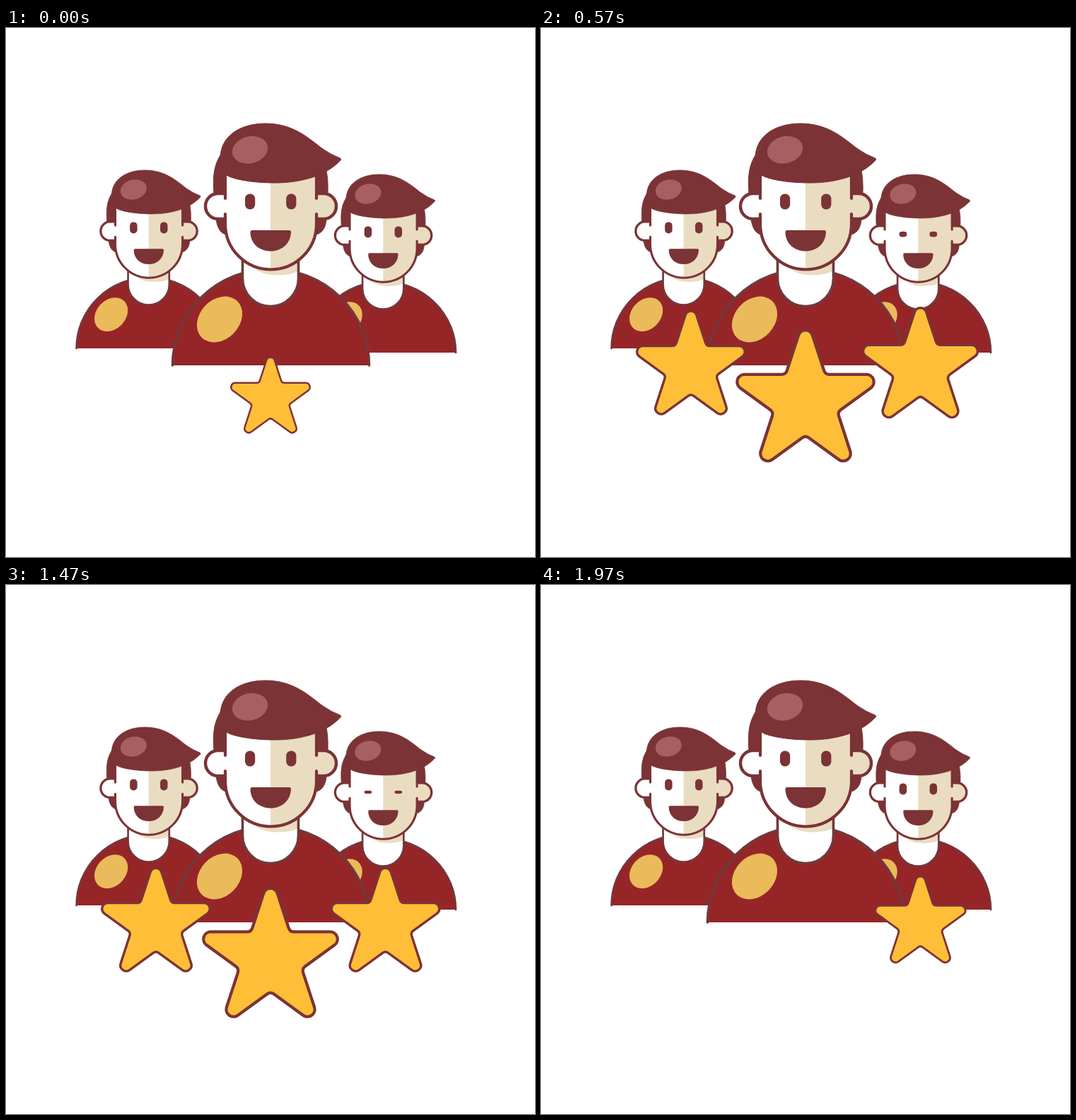
Recreate the animation shown at these times as an HTML page with a canvas. Size 748 px wide and 748 px high, loop 2 s.

```html
<!DOCTYPE html>
<html lang="en">
<head>
<meta charset="utf-8">
<title>Team rating</title>
<style>
html, body { margin: 0; width: 100%; height: 100%; overflow: hidden; background: #fff; }
canvas { display: block; width: 748px; height: 748px; }
</style>
</head>
<body>
<canvas id="stage" width="748" height="748"></canvas>
<script>
const ctx = document.getElementById('stage').getContext('2d');
const LOOP = 2000, FPS = 30;
const DARK = '#7b3336', EDGE = '#70393d', SHIRT = '#962528', GOLD = '#ebba5a';
const SHADE = '#eadcc1', SHINE = '#a75f62', STAR = '#ffbe37', WHITE = '#fff';

const shapes = {
  body: 'M235.5 477 A138.8 136 0 0 1 513.5 477',
  neck: 'M334.5 325 V354 A39.5 39.5 0 0 0 413.5 354 V325',
  backHair: 'M303 180 C292 198 293 215 294 235 L297 270 C299 285 305 292 314 292.5 H435 C445 292 452 285 453 270 L455 232 C456 210 452 192 446 180 Z',
  earL: 'M311 234 H300 A18 18 0 0 0 300 270 H311',
  earR: 'M438 234 H449 A18 18 0 0 1 449 270 H438',
  face: 'M310 200 V277 A64.5 64.5 0 0 0 439 277 V200 Z',
  half: 'M374 200 V341.5 A64.5 64.5 0 0 0 439 277 V200 Z',
  jaw: 'M310 205 V241 M310 263 V277 A64.5 64.5 0 0 0 439 277 V263 M439 241 V205',
  hair: 'M303 186 C302 152 332 135 367 135 C408 135 430 158 448 171 Q460 179.5 472.5 184 Q475 186 472 188 C450 211 413 219 380 219 C345 219 318 213 311 207.5 C305 202 303 194 303 186 Z',
  mouth: 'M348 286 H400.5 Q403 286 403 289 C402 305 390 315.5 374.2 315.5 C358 315.5 346 305 345.5 289 Q345.5 286 348 286 Z'
};
for (const k in shapes) shapes[k] = new Path2D(shapes[k]);

const people = [
  { x: 201.7, y: 201, s: .737, blinks: [] },
  { x: 533.2, y: 207, s: .737, blinks: [18, 44] },
  { x: 374, y: 135, s: 1, blinks: [26, 52] }
];

// grow and shrink: frames at which each star reaches its widest size
const stars = [
  { x: 212, y: 471.7, s: .788, grow: 10.75, shrink: 49.4 },
  { x: 536.5, y: 471.7, s: .788, grow: 18, shrink: 56.4 },
  { x: 374, y: 518, s: 1, grow: 3.9, shrink: 42.3 }
];

function fill(path, color) {
  ctx.fillStyle = color;
  ctx.fill(path);
}

function line(path, color, width) {
  ctx.strokeStyle = color;
  ctx.lineWidth = width;
  ctx.stroke(path);
}

function oval(x, y, rx, ry, angle, color) {
  const p = new Path2D();
  p.ellipse(x, y, rx, ry, angle * Math.PI / 180, 0, 7);
  fill(p, color);
}

function eye(x, open) {
  const base = 254, p = new Path2D();
  ctx.save();
  ctx.translate(x, base);
  ctx.scale(1, open);
  p.roundRect(-7.1, -19.4, 14.2, 21.8, 6.8);
  fill(p, DARK);
  ctx.restore();
}

function person(who, frame) {
  const open = Math.min(1, ...who.blinks.map(b => .28 + .21 * Math.abs(frame - b)));
  ctx.save();
  ctx.translate(who.x, who.y);
  ctx.scale(who.s, who.s);
  ctx.translate(-374, -135);

  fill(shapes.body, SHIRT);
  line(shapes.body, EDGE, 3.6);
  oval(302, 412, 36, 28, -46, GOLD);

  fill(shapes.neck, WHITE);
  ctx.save();
  ctx.clip(shapes.neck);
  oval(385, 336, 34, 13.5, 0, SHADE);
  ctx.restore();
  line(shapes.neck, EDGE, 3.6);

  fill(shapes.backHair, DARK);
  line(shapes.backHair, DARK, 1);
  fill(shapes.earL, WHITE);
  fill(shapes.earR, SHADE);
  line(shapes.earL, DARK, 4.5);
  line(shapes.earR, DARK, 4.5);
  fill(shapes.face, WHITE);
  fill(shapes.half, SHADE);
  line(shapes.jaw, DARK, 4.2);
  fill(shapes.hair, DARK);
  line(shapes.hair, DARK, 1);
  oval(345, 172.3, 25.5, 19, -14, SHINE);

  eye(345.1, open);
  eye(403.3, open);
  fill(shapes.mouth, DARK);
  ctx.restore();
}

function starPath() {
  const p = [], inner = 47.6, outer = 124.6;
  for (let i = 0; i < 10; i++) {
    const a = i * Math.PI / 5, r = i % 2 ? inner : outer;
    p.push([r * Math.sin(a), -r * Math.cos(a)]);
  }
  ctx.beginPath();
  ctx.moveTo((p[9][0] + p[0][0]) / 2, (p[9][1] + p[0][1]) / 2);
  for (let i = 0; i < 10; i++) {
    ctx.arcTo(...p[i], ...p[(i + 1) % 10], i % 2 ? 8 : 10.5);
  }
  ctx.closePath();
}

function ease(p) {
  p = Math.max(0, Math.min(1, p));
  return p * p * (3 - 2 * p);
}

// zero to peak in 8 frames, peak to rest in 4
function pop(d) {
  const peak = 1.11;
  return d < 0 ? peak * ease((d + 8) / 8) : peak - (peak - 1) * ease(d / 4);
}

function star(st, frame) {
  const size = st.s * pop(frame - st.grow) * pop(st.shrink - frame);
  if (size < .005) return;
  ctx.save();
  ctx.translate(st.x, st.y);
  ctx.scale(size, size);
  ctx.translate(0, 10.4);
  starPath();
  ctx.fillStyle = STAR;
  ctx.fill();
  ctx.strokeStyle = DARK;
  ctx.lineWidth = 4.3;
  ctx.stroke();
  ctx.restore();
}

function draw(now) {
  const frame = Math.floor((now % LOOP + 3.4) * FPS / 1000) % 60;
  ctx.fillStyle = WHITE;
  ctx.fillRect(0, 0, 748, 748);
  ctx.lineCap = ctx.lineJoin = 'round';
  people.forEach(p => person(p, frame));
  stars.forEach(s => star(s, frame));
}

const start = performance.now();
function tick() {
  draw(performance.now() - start);
  requestAnimationFrame(tick);
}
tick();
</script>
</body>
</html>
```
